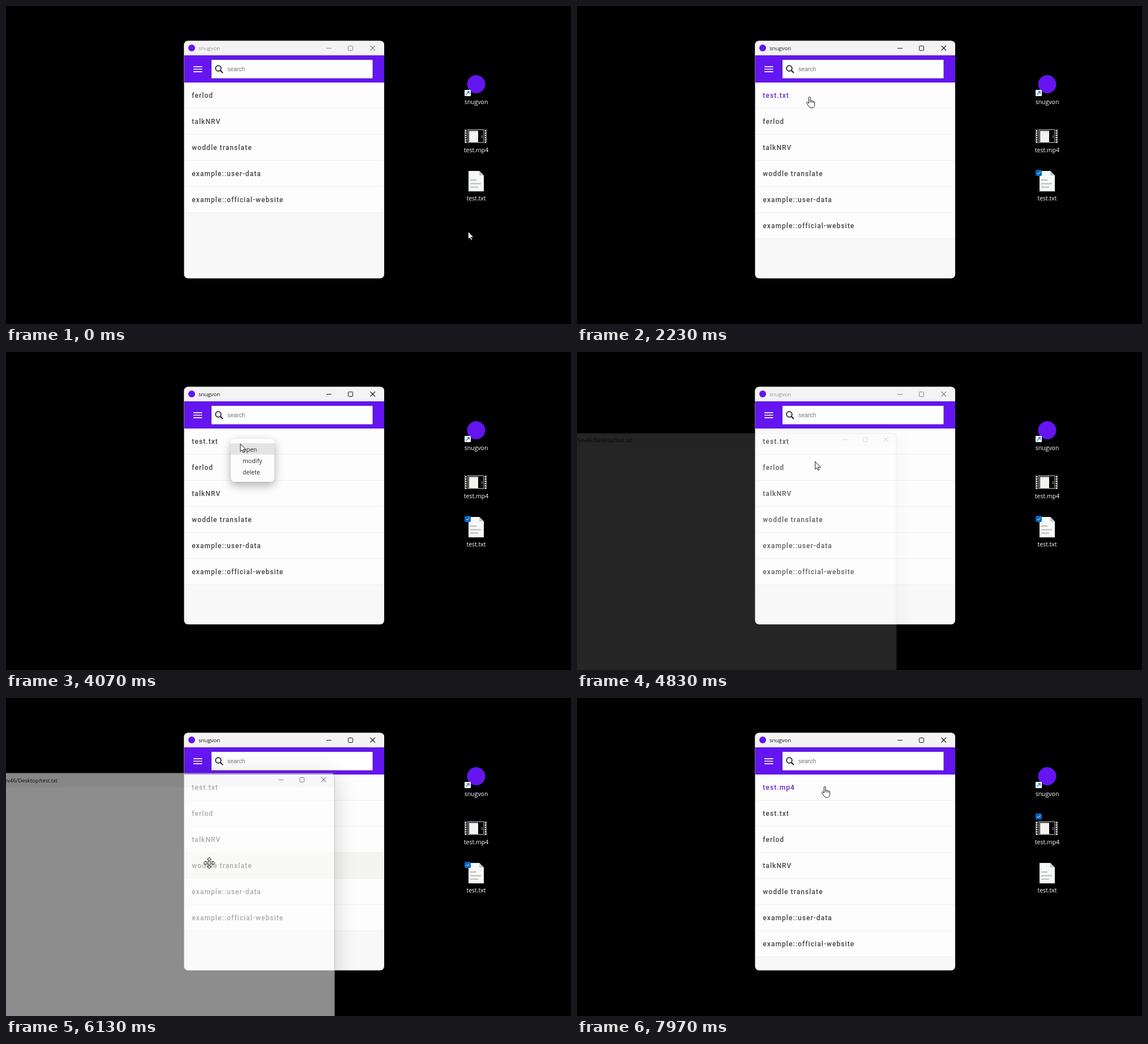
An HTML page with a canvas for the animation above (8000 ms loop, 998 by 561 pixels).

```html
<!DOCTYPE html>
<html lang="en">
<head>
<meta charset="utf-8">
<style>
  html, body { margin: 0; width: 100%; height: 100%; overflow: hidden; background: #000; }
  canvas { display: block; }
</style>
</head>
<body>
<canvas id="stage" width="998" height="561"></canvas>
<script>
const WIDTH = 998, HEIGHT = 561, LOOP = 8000;
const stage = document.getElementById('stage').getContext('2d');
const layer = new OffscreenCanvas(WIDTH, HEIGHT).getContext('2d');
let ctx = stage;

const PURPLE = '#6415f0';
const UI = '"Open Sans", "Noto Sans", sans-serif';
const APP = 'Roboto, sans-serif';
const APP_NAME = 'snugvon';
const FILE_PATH = 'C:\\Users\\yxv46\\Desktop\\test.txt';
const ITEMS = ['ferlod', 'talkNRV', 'woddle translate', 'example::user-data', 'example::official-website'];
const ROW = 46, LIST_TOP = 135, DETAILS = 156;

// Moments of the story, in ms
const T = {
  hoverTxt: 760, pressTxt: 950, dragTxt: 1150, dropTxt: 2080,
  expand: 2430, collapse: 3360, menu: 3810, menuEnd: 4480,
  open: 4790, close: 6050, hoverMp4: 6680, pressMp4: 7000, dragMp4: 7130, dropMp4: 7690
};

// Pointer stops: time, x, y
const STOPS = [
  [0, 816.5, 398], [500, 816.5, 398], [860, 820, 305], [1150, 820, 305],
  [1670, 675, 279], [2060, 430, 165], [2330, 400, 158], [2560, 400, 158],
  [2760, 462, 307], [2990, 409, 307], [3210, 398, 160], [3500, 398, 160],
  [3700, 397, 153], [3880, 397, 153], [4070, 414, 162], [4450, 428, 170],
  [5100, 416.5, 207], [5600, 416.5, 207], [6050, 359, 291], [6300, 359, 291],
  [6740, 858, 240], [6920, 822, 232], [7130, 822, 232], [7680, 442, 168],
  [7920, 436, 156], [8000, 436, 156]
];

const ICON = {
  doc: 'M14 2H6c-1.1 0-2 .9-2 2v16c0 1.1.9 2 2 2h12c1.1 0 2-.9 2-2V8l-6-6zm2 16H8v-2h8v2zm0-4H8v-2h8v2zm-3-5V3.5L18.5 9H13z',
  eye: 'M12 4.5C7 4.5 2.7 7.6 1 12c1.7 4.4 6 7.5 11 7.5s9.3-3.1 11-7.5c-1.7-4.4-6-7.5-11-7.5zM12 17a5 5 0 1 1 0-10 5 5 0 0 1 0 10zm0-8a3 3 0 1 0 0 6 3 3 0 0 0 0-6z',
  link: 'M3.9 12c0-1.7 1.4-3.1 3.1-3.1h4V7H7a5 5 0 0 0 0 10h4v-1.9H7c-1.7 0-3.1-1.4-3.1-3.1zM8 13h8v-2H8zM17 7h-4v1.9h4a3.1 3.1 0 0 1 0 6.2h-4V17h4a5 5 0 0 0 0-10z'
};
const POINTER = {
  arrow: 'M0 0V13.6L3.1 10.8 5 15.4 7.2 14.4 5.2 10H9.6Z',
  hand: 'M.2 1.6C.2-.4 3-.4 3 1.6V7.2C3.6 6.2 5.5 6.4 5.7 7.6 6.5 6.8 8.2 7.1 8.4 8.3 9.3 7.8 10.6 8.3 10.6 9.6V13.5C10.6 17.5 8.6 19.5 5.6 19.5 2.5 19.5 1.2 18.2-.3 16L-3.4 11.4C-4.4 9.8-2.4 8.8-1.4 10L.2 11.8Z',
  move: 'M0-10 3.5-6H1.2V-1.2H6V-3.5L10 0 6 3.5V1.2H1.2V6H3.5L0 10-3.5 6H-1.2V1.2H-6V3.5L-10 0-6-3.5V-1.2H-1.2V-6H-3.5Z'
};

const clamp = v => Math.max(0, Math.min(1, v));
const ease = v => { v = clamp(v); return v * v * (3 - 2 * v); };
const within = (t, a, b) => t >= a && t < b;

function rect(x, y, w, h, color, radius = 0) {
  ctx.fillStyle = color;
  ctx.beginPath();
  ctx.roundRect(x, y, w, h, radius);
  ctx.fill();
}

function outline(x, y, w, h, color, radius = 0) {
  ctx.strokeStyle = color;
  ctx.lineWidth = 1;
  ctx.beginPath();
  ctx.roundRect(x, y, w, h, radius);
  ctx.stroke();
}

function line(color, width, ...points) {
  ctx.strokeStyle = color;
  ctx.lineWidth = width;
  ctx.beginPath();
  points.forEach(([x, y]) => ctx.lineTo(x, y));
  ctx.stroke();
}

function disc(x, y, r, color) {
  ctx.fillStyle = color;
  ctx.beginPath();
  ctx.arc(x, y, r, 0, 2 * Math.PI);
  ctx.fill();
}

function text(str, x, y, font, color, { align = 'left', spacing = 0 } = {}) {
  ctx.font = font;
  ctx.fillStyle = color;
  ctx.textAlign = align;
  ctx.letterSpacing = spacing + 'px';
  ctx.fillText(str, x, y);
}

// Runs draw with its own canvas state
function scoped(draw) {
  ctx.save();
  draw();
  ctx.restore();
}

// Draws onto a separate layer, then blends that layer as a whole
function blended(alpha, draw) {
  ctx = layer;
  ctx.clearRect(0, 0, WIDTH, HEIGHT);
  scoped(draw);
  ctx = stage;
  ctx.globalAlpha = alpha;
  ctx.drawImage(layer.canvas, 0, 0);
}

function clipRect(x, y, w, h, radius = 0) {
  ctx.beginPath();
  ctx.roundRect(x, y, w, h, radius);
  ctx.clip();
}

function shadow(blur, y, alpha) {
  ctx.shadowColor = `rgba(0,0,0,${alpha})`;
  ctx.shadowBlur = blur;
  ctx.shadowOffsetY = y;
}

function captionButtons(right, y, color) {
  line(color, 1, [right - 102, y + .5], [right - 93, y + .5]);
  outline(right - 63.5, y - 3.5, 8, 8, color, 1);
  line(color, 1.1, [right - 24.5, y - 4], [right - 16, y + 4.5]);
  line(color, 1.1, [right - 16, y - 4], [right - 24.5, y + 4.5]);
}

function checkbox(x, y) {
  rect(x - 5.5, y - 5.5, 11, 11, '#0067c0', 2.5);
  line('#fff', 1, [x - 2.5, y], [x - .7, y + 2], [x + 3, y - 2]);
}

function label(str, y) {
  text(str, 830.5, y, '10.5px ' + UI, '#fff', { align: 'center' });
}

function textFile() {
  ctx.fillStyle = '#f6f9fa';
  ctx.fill(new Path2D('M817 291H836L844 299V327H817Z'));
  ctx.fillStyle = '#c3c8ca';
  ctx.fill(new Path2D('M836 291V299H844Z'));
  [[307, 11], [313.5, 19], [319.5, 14]].forEach(([y, w]) => rect(820, y - 1, w, 2, '#b9b9aa'));
  label('test.txt', 343);
}

function videoFile() {
  rect(810, 217.5, 39, 24, '#8d8d8d');
  rect(811, 218, 37, 23, '#101010');
  for (let y = 219; y < 241; y += 4) {
    rect(811, y, 2.5, 2.4, '#eee');
    rect(845.5, y, 2.5, 2.4, '#eee');
  }
  rect(815.5, 218, 28.5, 23, '#9a9a9a');
  rect(817, 219, 26, 21, '#000');
  rect(818, 220, 16, 20, '#f3f3f0');
  rect(818, 220, 16, 2, '#d0cfe0');
  rect(840, 228, 1.5, 5, '#777');
  label('test.mp4', 258);
}

function desktop(t) {
  disc(830.5, 138, 16, PURPLE);
  rect(810, 148, 11, 11, '#fff', 1);
  line('#1272c8', 1.3, [812.5, 156.5], [818, 151]);
  line('#1272c8', 1.3, [814.5, 151], [818.2, 151], [818.2, 154.7]);
  label(APP_NAME, 173);

  if (within(t, T.hoverMp4, T.dropMp4)) rect(798, 202, 65, 61, t < T.pressMp4 ? '#303030' : '#4d4d4d', 2);
  if (within(t, T.hoverTxt, T.dropTxt)) rect(798, 287, 65, 61, t < T.pressTxt ? '#303030' : '#4d4d4d', 2);
  videoFile();
  textFile();
  if (t >= T.hoverMp4) checkbox(815.5, 209);
  if (within(t, T.hoverTxt, T.pressMp4)) checkbox(815.5, 294.5);
}

function header() {
  rect(315, 87, 353, 48, PURPLE);
  [107.2, 111.5, 115.8].forEach(y => line('#fff', 1.7, [331, y], [346.5, y]));
  rect(362.5, 94.5, 285.5, 33.5, '#4b35a8');
  rect(363, 95, 284.5, 32.5, '#fefefe');
  ctx.strokeStyle = '#222';
  ctx.lineWidth = 1.8;
  ctx.beginPath();
  ctx.arc(375, 110, 4.8, 0, 2 * Math.PI);
  ctx.stroke();
  line('#222', 2.2, [378.5, 113.5], [383, 118]);
  text('search', 391, 115, '10.4px "Liberation Sans", sans-serif', '#757575');
}

function detailIcon(name, y) {
  scoped(() => {
    ctx.translate(328.2, y - 10.3);
    ctx.scale(.857, .857);
    ctx.fillStyle = '#707070';
    ctx.fill(new Path2D(ICON[name]));
  });
}

function details(t) {
  detailIcon('doc', 212);
  detailIcon('eye', 259.5);
  detailIcon('link', 307);
  const font = '13.6px ' + APP;
  text(FILE_PATH, 376, 311.5, font, '#444');
  if (t < 2760) return;
  const widthTo = n => ctx.measureText(FILE_PATH.slice(0, n)).width;
  const end = widthTo(13);
  const start = end + (widthTo(5) - end) * ease((t - 2760) / 230);
  scoped(() => {
    clipRect(376 + start, 299, end - start, 16);
    rect(376, 299, 200, 16, '#2f8ff3');
    text(FILE_PATH, 376, 311.5, font, '#fff');
  });
}

function scrollbar() {
  rect(653, 135, 15, 345, '#f3f3f3');
  rect(655, 150, 11, 252, '#c0c0c0');
  ctx.fillStyle = '#a0a0a0';
  ctx.fill(new Path2D('M657 145.5H664L660.5 141.5Z'));
  ctx.fillStyle = '#505050';
  ctx.fill(new Path2D('M657 470.5H664L660.5 474.5Z'));
}

function list(t) {
  const items = [...ITEMS];
  if (t >= T.dropTxt) items.unshift('test.txt');
  if (t >= T.dropMp4) items.unshift('test.mp4');
  const opened = ease((t - T.expand) / 200) - ease((t - T.collapse) / 200);
  const firstLit = within(t, T.dropTxt + 40, 3720) || t > T.dropMp4 + 30;

  let y = LIST_TOP;
  items.forEach((name, i) => {
    const height = ROW + (i === 0 ? DETAILS * opened : 0);
    const hovered = i === 3 && within(t, T.close, 6400);
    rect(315, y, 353, height, hovered ? '#f4f4f3' : '#fdfdfd');
    text(name, 328.3, y + 26.6, '500 12px ' + APP, i === 0 && firstLit ? '#6a27c4' : '#444', { spacing: 1.07 });
    if (i === 0 && opened > 0) {
      scoped(() => {
        clipRect(315, y + ROW, 353, height - ROW);
        details(t);
      });
      rect(315, y, 2, height, '#5a22c8');
    }
    y += height;
    rect(315, y - 1, 353, 1, '#efeff1');
  });
  if (y > 480) scrollbar();
}

function appWindow(t) {
  const active = within(t, T.dropTxt, T.open) || within(t, T.close, T.pressMp4) || t >= T.dropMp4;
  clipRect(314.5, 61.5, 353.5, 419, 7);
  rect(314, 61, 355, 420, '#f8f8f8');
  rect(314, 61, 355, 26, '#f3f3f3');
  disc(328, 74, 6, PURPLE);
  text(APP_NAME, 340, 78, '9.6px ' + UI, active ? '#161616' : '#929292');
  captionButtons(668, 74, active ? '#161616' : '#858585');
  list(t);
  header();
}

function contextMenu() {
  scoped(() => {
    shadow(16, 6, .32);
    rect(397, 153, 77, 76, '#fdfdfd', 7);
  });
  rect(397, 161, 77, 20, '#e4e4e4');
  ['open', 'modify', 'delete'].forEach((s, i) => text(s, 418, 175.5 + i * 20.4, '10.6px ' + UI, '#262626'));
}

function viewerWindow(t) {
  const shown = ease((t - T.open) / 170), gone = clamp((t - T.close) / 182);
  const alpha = shown * (1 - gone);
  if (alpha <= 0) return;
  const scale = .92 + .08 * shown - .055 * gone;
  blended(alpha, () => {
    ctx.translate(217, 376);
    ctx.scale(scale, scale);
    ctx.translate(-217, -376);
    scoped(() => {
      shadow(38, 6, .32);
      rect(-156, 126, 746, 500, '#fdfdfd', 7);
    });
    rect(-156, 126, 746, 26, '#f3f3f3', [7, 7, 0, 0]);
    outline(-155.5, 126.5, 745, 499, '#8a8a8a', 7);
    text(FILE_PATH.replaceAll('\\', '/'), 88, 143, '9.6px ' + UI, '#161616', { align: 'right' });
    captionButtons(590, 138, '#161616');
  });
}

function dragImage(t, x, y) {
  const isText = within(t, T.dragTxt, T.dropTxt);
  if (!isText && !within(t, T.dragMp4, T.dropMp4)) return;
  blended(.72, () => {
    if (isText) {
      ctx.translate(x - 820, y - 305);
      textFile();
      rect(814, 344.5, 33, .8, '#fff');
      checkbox(814.5, 294.5);
    } else {
      ctx.translate(x - 822, y - 232);
      videoFile();
      checkbox(815.5, 209);
    }
  });
}

function pointerPosition(t) {
  const i = STOPS.findIndex(stop => stop[0] > t);
  const [t0, x0, y0] = STOPS[i - 1], [t1, x1, y1] = STOPS[i];
  const k = ease((t - t0) / (t1 - t0));
  return [x0 + (x1 - x0) * k, y0 + (y1 - y0) * k];
}

function pointer(t, x, y) {
  ctx.translate(x, y);
  ctx.lineJoin = 'round';
  if (within(t, 2680, 3090)) {
    line('#222', 1, [-2.5, -7.5], [2.5, -7.5]);
    line('#222', 1, [0, -7.5], [0, 7.5]);
    line('#222', 1, [-2.5, 7.5], [2.5, 7.5]);
    return;
  }
  const onRow = within(t, 2110, 2680) || within(t, 3130, 3800) || t > 7715;
  const kind = onRow ? 'hand' : within(t, T.close, 6400) ? 'move' : 'arrow';
  const shape = new Path2D(POINTER[kind]);
  ctx.fillStyle = '#fff';
  ctx.strokeStyle = '#111';
  ctx.lineWidth = 1;
  ctx.fill(shape);
  ctx.stroke(shape);
  if (kind === 'hand') {
    line('#111', .9, [3, 7], [3, 10.5]);
    line('#111', .9, [5.7, 7.6], [5.7, 10.8]);
    line('#111', .9, [8.4, 8.3], [8.4, 11]);
  }
}

function draw(t) {
  const [x, y] = pointerPosition(t);
  rect(0, 0, WIDTH, HEIGHT, '#000');
  desktop(t);
  scoped(() => appWindow(t));
  if (within(t, T.menu, T.menuEnd)) contextMenu();
  scoped(() => viewerWindow(t));
  scoped(() => dragImage(t, x, y));
  scoped(() => pointer(t, x, y));
}

const start = performance.now();
function tick() {
  draw((performance.now() - start) % LOOP);
  requestAnimationFrame(tick);
}
tick();
</script>
</body>
</html>
```
